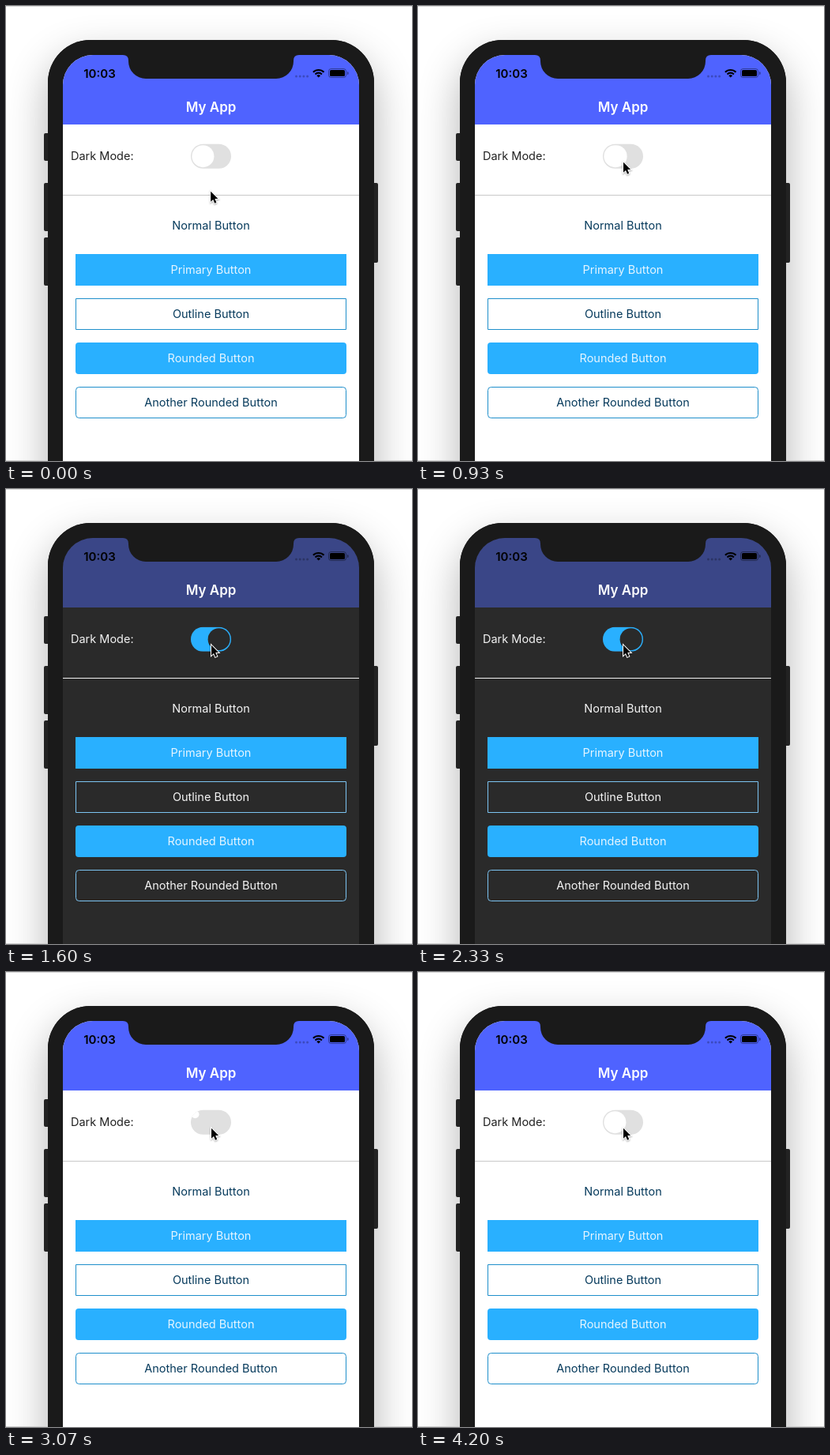
An HTML page with a canvas that plays this animation: 514 px wide and 576 px high, repeating every 4270 ms.

```html
<!DOCTYPE html>
<html lang="en">
<head>
<meta charset="utf-8">
<title>Dark mode switch</title>
<style>
  html, body { margin: 0; width: 100%; height: 100%; overflow: hidden; background: #fff; }
  canvas { display: block; }
</style>
</head>
<body>
<canvas id="stage" width="514" height="576"></canvas>
<script>
const ctx = document.getElementById('stage').getContext('2d');
const LOOP = 4270, STEP = 200 / 3, STEPS = 64;
const DARK_ON = 1000, DARK_OFF = 3066, GROW = 270;
const BODY = '#1a1a1a', BLUE = '#29b0ff';
const MID = 259.5;

const themes = {
  light: {
    bg: '#ffffff', header: '#4f63ff', label: '#222222', line: '#c8c8c8',
    text: '#063a5c', border: '#1f8fcb', track: '#e0e0e0', thumb: '#ffffff'
  },
  dark: {
    bg: '#2a2a2a', header: '#3a4687', label: '#f2f2f2', line: '#f0f0f0',
    text: '#f5f5f5', border: '#7cc4f2', track: '#3d4141', thumb: '#2a2a2a'
  }
};

const clamp = v => Math.max(0, Math.min(1, v));
const ease = v => { v = clamp(v); return v * v * (3 - 2 * v); };

function rect(x, y, w, h, color) {
  ctx.fillStyle = color;
  ctx.fillRect(x, y, w, h);
}

function round(x, y, w, h, r, color) {
  ctx.beginPath();
  ctx.roundRect(x, y, w, h, r);
  ctx.fillStyle = color;
  ctx.fill();
}

function text(str, x, y, size, weight, color, align = 'center') {
  ctx.font = `${weight} ${size}px Inter, "Liberation Sans", sans-serif`;
  ctx.textAlign = align;
  ctx.fillStyle = color;
  ctx.fillText(str, x, y);
}

function drawPhone() {
  rect(0, 0, 514, 576, '#fff');
  ctx.save();
  ctx.shadowColor = 'rgba(0,0,0,0.3)';
  ctx.shadowBlur = 52;
  ctx.shadowOffsetY = 22;
  round(53, 43, 413, 800, 54, BODY);
  ctx.restore();
  rect(0, 0, 514, 1, '#dadada');
  rect(0, 575, 514, 1, '#d2d2d2');
  for (const [y, h] of [[161, 35], [224, 61], [293, 61]]) round(48, y, 8, h, 2, '#232323');
  round(463, 224, 8, 101, 2, '#232323');
  round(53, 43, 413, 800, 54, BODY);
}

function drawNotch() {
  ctx.beginPath();
  ctx.moveTo(148, 61);
  ctx.lineTo(148, 62);
  ctx.quadraticCurveTo(155, 62, 155, 69);
  ctx.arcTo(155, 92, 178, 92, 22);
  ctx.arcTo(364, 92, 364, 69, 22);
  ctx.lineTo(364, 69);
  ctx.quadraticCurveTo(364, 62, 371, 62);
  ctx.lineTo(371, 61);
  ctx.fillStyle = BODY;
  ctx.fill();
}

function drawStatus() {
  text('10:03', 118.5, 90.5, 15, 600, '#000');
  for (let i = 0; i < 4; i++) round(366 + i * 4.7, 87.5, 3, 3, 1.5, 'rgba(0,0,0,0.25)');

  // Wi-Fi fan
  const a = -Math.PI * 0.75, b = -Math.PI * 0.25;
  ctx.strokeStyle = ctx.fillStyle = '#000';
  ctx.lineWidth = 2.2;
  for (const r of [5.9, 9.6]) {
    ctx.beginPath();
    ctx.arc(395.7, 90.6, r, a, b);
    ctx.stroke();
  }
  ctx.beginPath();
  ctx.moveTo(395.7, 90.6);
  ctx.arc(395.7, 90.6, 3.4, a, b);
  ctx.fill();

  // Battery
  ctx.beginPath();
  ctx.roundRect(408.5, 79.5, 22, 11, 3);
  ctx.strokeStyle = 'rgba(0,0,0,0.4)';
  ctx.lineWidth = 1;
  ctx.stroke();
  round(410, 81, 19, 8, 1.6, '#000');
  round(432, 83, 1.5, 4, [0, 1.5, 1.5, 0], 'rgba(0,0,0,0.45)');
}

function drawButton(label, y, theme, filled, r) {
  if (filled) {
    round(88, y, 343, 40, r, BLUE);
  } else {
    ctx.beginPath();
    ctx.roundRect(88.5, y + 0.5, 342, 39, r);
    ctx.strokeStyle = theme.border;
    ctx.lineWidth = 1;
    ctx.stroke();
  }
  text(label, MID, y + 25.3, 14.5, 400, filled ? '#e6f5ff' : theme.text);
}

// The knob and fill grow out of the top left corner after each theme change.
function drawSwitch(theme, on, scale, press) {
  ctx.save();
  ctx.beginPath();
  ctx.roundRect(234, 174.7, 51, 31, 15.5);
  ctx.clip();
  rect(230, 170, 60, 40, theme.track);
  ctx.translate(234, 174.7);
  ctx.scale(scale, scale);
  if (on) rect(0, 0, 51, 31, BLUE);
  const w = 28 + press;
  round(on ? 49.6 - w : 1.4, 1.5, w, 28, 14, theme.thumb);
  ctx.restore();
}

function drawCursor(x, y) {
  ctx.save();
  ctx.translate(x, y);
  ctx.beginPath();
  ctx.moveTo(0, 0);
  for (const [px, py] of [[0, 13], [3, 10.3], [5, 15], [7.2, 14.1], [5.2, 9.4], [9.2, 9.4]]) ctx.lineTo(px, py);
  ctx.closePath();
  ctx.shadowColor = 'rgba(0,0,0,0.35)';
  ctx.shadowBlur = 2;
  ctx.shadowOffsetY = 1;
  ctx.strokeStyle = '#fff';
  ctx.lineWidth = 2;
  ctx.stroke();
  ctx.shadowColor = 'transparent';
  ctx.fillStyle = '#000';
  ctx.fill();
  ctx.restore();
}

function drawScreen(t) {
  const on = t >= DARK_ON - 1 && t < DARK_OFF;
  const theme = on ? themes.dark : themes.light;
  const since = on ? t - DARK_ON : t - DARK_OFF;
  const scale = since < 0 ? 1 : ease((since + 108) / GROW);
  const pressed = (t > 930 && t < DARK_ON - 1) || (t > 2999 && t < DARK_OFF);

  ctx.save();
  ctx.beginPath();
  ctx.roundRect(72, 62, 375, 700, 38);
  ctx.clip();
  rect(72, 62, 375, 514, theme.bg);
  rect(72, 62, 375, 88, theme.header);
  rect(72, 239, 375, 1, theme.line);
  ctx.restore();

  drawNotch();
  drawStatus();
  text('My App', MID, 134, 17, 600, '#fff');
  text('Dark Mode:', 82, 195.3, 14.5, 400, theme.label, 'left');
  drawSwitch(theme, on, scale, pressed ? 1.2 : 0);
  text('Normal Button', MID, 283.3, 14.5, 400, theme.text);
  drawButton('Primary Button', 314, theme, true, 0);
  drawButton('Outline Button', 370, theme, false, 0);
  drawButton('Rounded Button', 426, theme, true, 4);
  drawButton('Another Rounded Button', 482, theme, false, 4);

  const move = ease(t / 530);
  drawCursor(259.2 + move * 0.8, 234.7 - move * 37);
}

function frame() {
  const now = performance.now() % LOOP;
  const step = Math.floor((now + 4) / STEP) % STEPS;
  drawPhone();
  drawScreen(step * STEP);
  requestAnimationFrame(frame);
}
frame();
</script>
</body>
</html>
```
